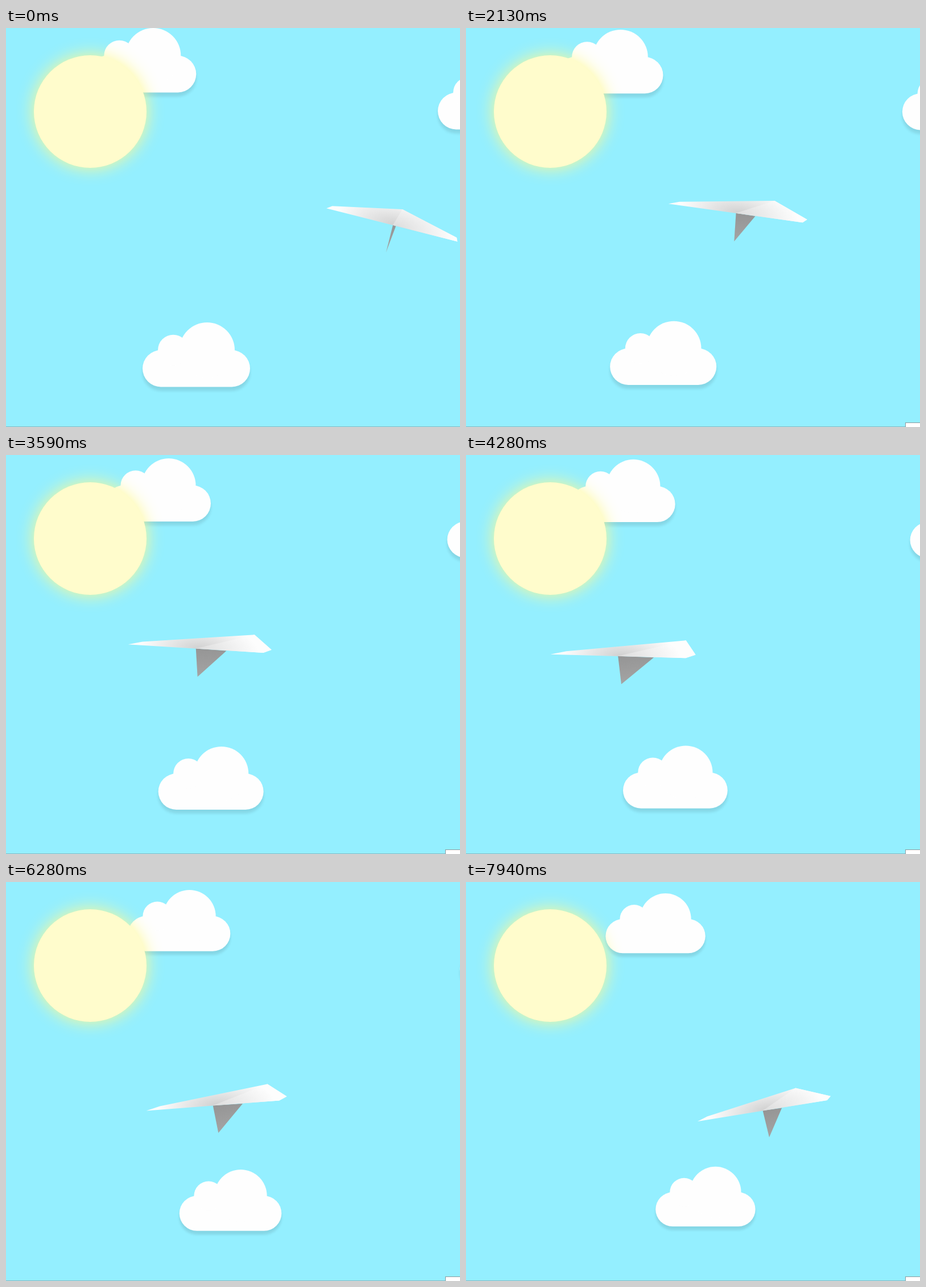
These frames come from a looping animation (798x702 px, 8000 ms). An HTML page with a canvas:

```html
<!DOCTYPE html>
<html lang="en">
<head>
<meta charset="utf-8">
<title>Paper plane</title>
<style>
  html, body { margin: 0; width: 100%; height: 100%; overflow: hidden; background: #94efff; }
  canvas { display: block; }
</style>
</head>
<body>
<canvas id="stage" width="798" height="702"></canvas>
<script>
const ctx = document.getElementById('stage').getContext('2d');
const LOOP = 8000;
const TURN_AT = 4770;
const POPUP_AT = 1300;

// The sky shrinks toward this far point as the camera drifts.
const FAR = { x: 1535, y: 277 };
const CLOUDS = [{ x: 145.3, y: 48.7 }, { x: 240, y: 566.7 }, { x: 759, y: 113.7 }];

function driftAt(t) {
  const u = t / LOOP;
  return u * (35.2 + 90.9 * u - 14.3 * u * u);
}

function withShadow(color, offsetY, blur, draw) {
  ctx.save();
  ctx.shadowColor = color;
  ctx.shadowOffsetY = offsetY;
  ctx.shadowBlur = blur;
  draw();
  ctx.restore();
}

function disc(x, y, r) {
  ctx.beginPath();
  ctx.arc(x, y, r, 0, Math.PI * 2);
  ctx.fill();
}

function trace(points) {
  ctx.beginPath();
  points.forEach(([x, y]) => ctx.lineTo(x, y));
  ctx.closePath();
}

function drawCloud({ x, y }, drift, scale) {
  ctx.save();
  ctx.translate(x * scale + drift, FAR.y + (y - FAR.y) * scale);
  ctx.scale(0.54 * scale, 0.54 * scale);
  ctx.fillStyle = '#fefefe';
  withShadow('rgba(0,0,0,.1)', 7 * scale, 5 * scale, () => {
    ctx.beginPath();
    ctx.roundRect(0, 0, 350, 120, 60);
    ctx.fill();
  });
  disc(100, 0, 50);
  disc(210, 0, 90);
  ctx.restore();
}

function drawSun() {
  ctx.fillStyle = '#fffccc';
  withShadow('#fffa90', 0, 30, () => disc(148, 147, 99));
}

// Soft oval shade around the keel; the path is traced before squashing the gradient.
function fillFacet(points, dark) {
  trace(points);
  ctx.save();
  ctx.scale(1, 0.42);
  const shade = ctx.createRadialGradient(6, 0, 0, 6, 0, 105);
  shade.addColorStop(0, dark);
  shade.addColorStop(1, '#fdfdfd');
  ctx.fillStyle = shade;
  ctx.fill();
  ctx.restore();
}

function drawPlane(t, drift) {
  const since = t - TURN_AT;
  const swing = skew => Math.abs(since) - skew * since;
  const yaw = swing(0.1) / (TURN_AT * 1.1);
  const size = 1 - drift / FAR.x / 2;

  // Points are relative to the keel; yaw moves them along the wing only.
  const nose = [-120.5, 0];
  const edge = [-90 - 21.5 * yaw, -6.2];
  const ridge = [133 - 123.6 * yaw, -31];
  const wing = [141 - 27 * yaw, -6];
  const tail = [121 - 4 * yaw, 0.3];
  const keel = [0, 0];
  const finBack = [70.5 - 65 * yaw, 0.7];
  const finTip = [8 - 8 * yaw, 50];

  ctx.save();
  ctx.translate(220 + 0.0958 * swing(0.007), 364.3 + 38.8 * Math.sin(0.00056 * since));
  ctx.rotate((14.2 - 0.00297 * t) * Math.PI / 180);
  ctx.scale(size, size);

  const finShade = ctx.createLinearGradient(...keel, ...finTip);
  finShade.addColorStop(0, '#959595');
  finShade.addColorStop(1, '#a4a4a4');
  trace([keel, finBack, finTip]);
  ctx.fillStyle = finShade;
  ctx.fill();

  fillFacet([nose, edge, ridge, wing, tail], '#d0d0d0');
  fillFacet([keel, ridge, wing, tail], '#dedede');
  ctx.restore();
}

function drawPopup() {
  ctx.fillStyle = '#8c9a9e';
  ctx.fillRect(772, 694, 26, 8);
  ctx.fillStyle = '#fff';
  ctx.fillRect(773, 695, 25, 7);
}

function drawFrame(t) {
  const drift = driftAt(t);
  ctx.fillStyle = '#94efff';
  ctx.fillRect(0, 0, 798, 702);
  CLOUDS.forEach(cloud => drawCloud(cloud, drift, 1 - drift / FAR.x));
  drawSun();
  drawPlane(t, drift);
  ctx.fillStyle = '#88b8c2';
  ctx.fillRect(0, 701, 798, 1);
  if (t >= POPUP_AT) drawPopup();
}

const start = performance.now();
function tick() {
  drawFrame((performance.now() - start) % LOOP);
  requestAnimationFrame(tick);
}
tick();
</script>
</body>
</html>
```
